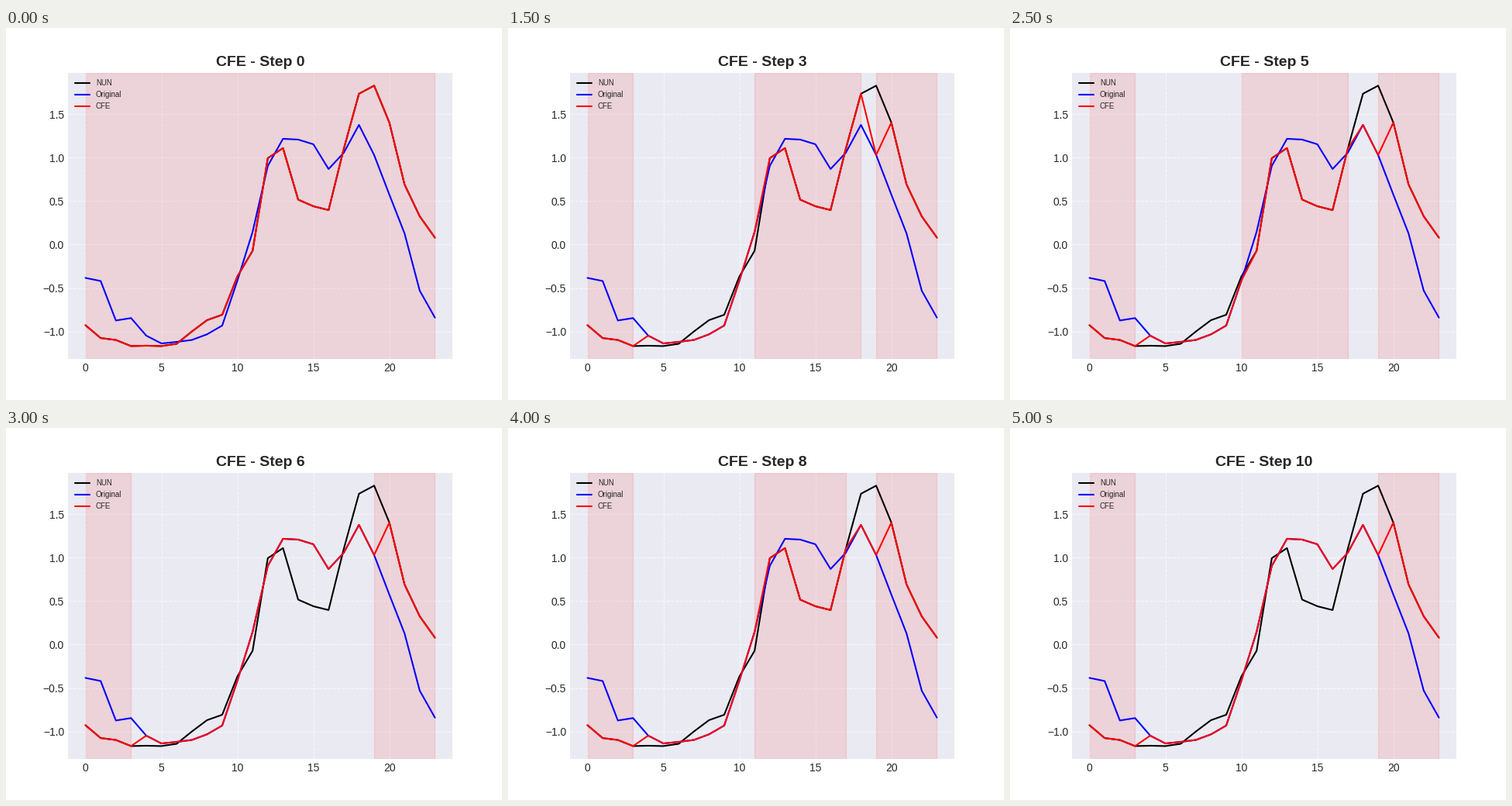
Animation, 640 px wide and 480 px high, one loop 5500 ms. Source, as a matplotlib script:

```python
import matplotlib.pyplot as plt
import numpy as np
from matplotlib.animation import FuncAnimation

plt.style.use("seaborn-v0_8-darkgrid")
plt.rcParams.update({
    "font.family": "Liberation Sans",
    "font.size": 10,
    "figure.facecolor": "white",
    "lines.linewidth": 1.5,
})

nun = np.array([
    -0.927, -1.075, -1.097, -1.167, -1.163, -1.167, -1.141, -1.0,
    -0.869, -0.807, -0.366, -0.071, 0.994, 1.11, 0.517, 0.441,
    0.397, 1.10, 1.735, 1.828, 1.404, 0.692, 0.325, 0.08])
base = np.array([
    -0.383, -0.419, -0.873, -0.845, -1.047, -1.137, -1.119, -1.097,
    -1.032, -0.931, -0.414, 0.147, 0.905, 1.217, 1.208, 1.154,
    0.869, 1.056, 1.377, 1.03, 0.575, 0.129, -0.53, -0.84])
x = np.arange(len(nun))

# Replaced segments (start, end] at each step; -1 includes the first sample
HEAD, TAIL = (-1, 3), (19, 23)
CYCLE = [
    [HEAD, TAIL],
    [HEAD, (11, 18), TAIL],
    [HEAD, (11, 17), TAIL],
    [HEAD, (10, 17), TAIL],
]
STEPS = [[(-1, 23)], [(-1, 8), TAIL]] + [CYCLE[i % 4] for i in range(9)]

fig, ax = plt.subplots(figsize=(6.4, 4.8), dpi=100)
ax.plot(x, nun, color="black", label="NUN")
ax.plot(x, base, color="blue", label="Original")
cfe_line, = ax.plot(x, nun, color="red", label="CFE")
ax.grid(True, linestyle="--", linewidth=0.8, alpha=0.7)
ax.legend(loc="upper left", fontsize=7, frameon=False)
ax.set_xlim(ax.get_xlim())
ax.set_ylim(ax.get_ylim())
title = ax.set_title("", fontsize=14, fontweight="bold")
spans = []


def update(step):
    while spans:
        spans.pop().remove()
    mask = np.zeros(len(x), dtype=bool)
    for start, end in STEPS[step]:
        mask |= (x > start) & (x <= end)
        spans.append(ax.axvspan(max(start, 0), end, color="red", alpha=0.1))
    cfe_line.set_ydata(np.where(mask, nun, base))
    title.set_text(f"CFE - Step {step}")
    return [cfe_line, title, *spans]


anim = FuncAnimation(fig, update, frames=len(STEPS), init_func=lambda: update(0),
                     interval=500, repeat=True, repeat_delay=0, blit=False)
plt.show()
```
